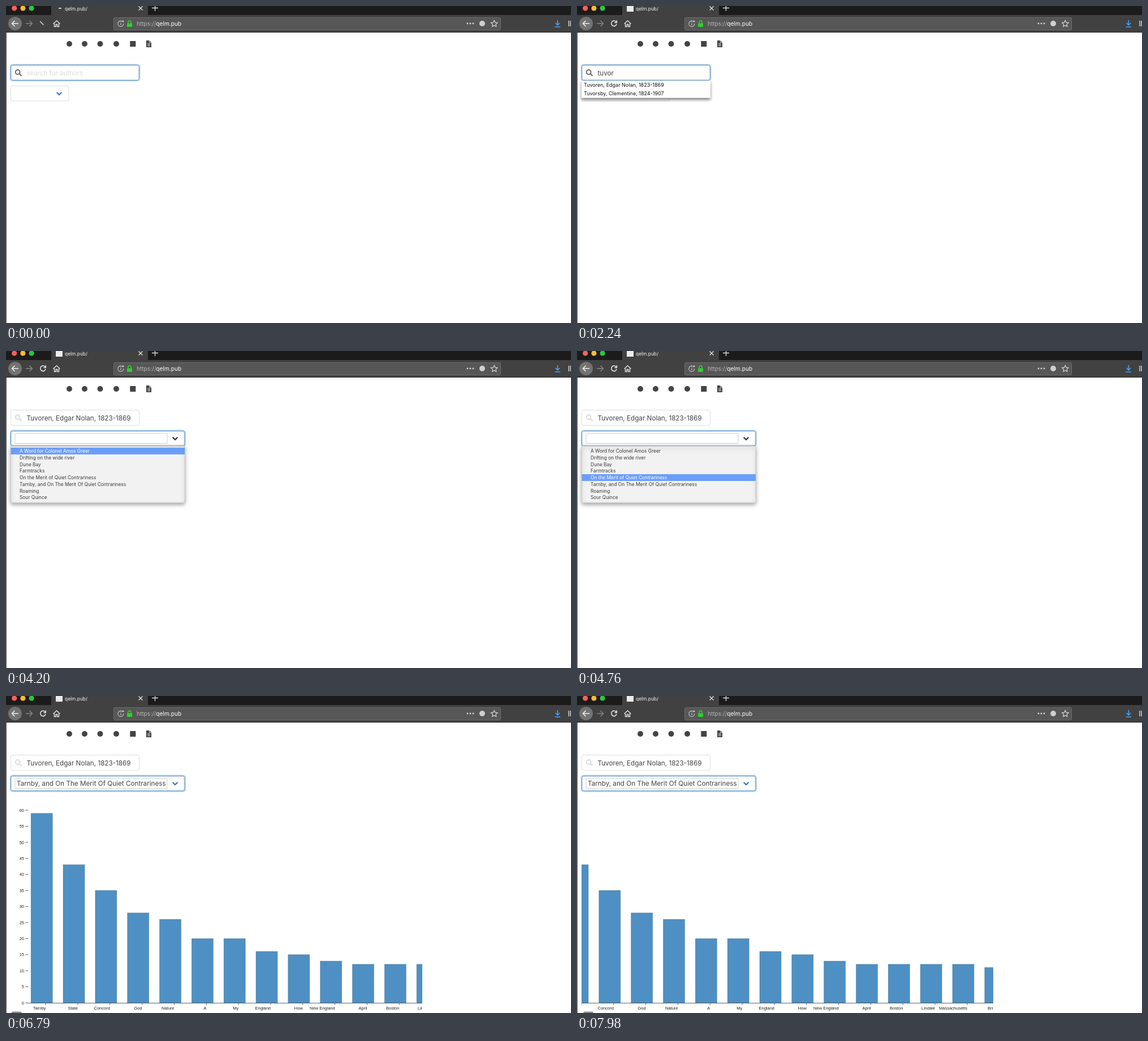
Recreate the animation shown at these times as an HTML page with a canvas. Size 999 px wide and 561 px high, loop 8 s.

```html
<!DOCTYPE html>
<html lang="en">
<head>
<meta charset="utf-8">
<style>
html, body { margin: 0; width: 100%; height: 100%; overflow: hidden; background: #fff; }
canvas { display: block; }
</style>
</head>
<body>
<canvas id="stage" width="999" height="561"></canvas>
<script>
const LOOP = 8000, STEP = 70;
const SANS = 'Inter, Roboto, sans-serif', CHART = '"Liberation Sans", Arial, sans-serif';
const c = document.getElementById('stage').getContext('2d');

const SITE = 'qelm.pub', QUERY = 'tuvor';
const AUTHOR = 'Tuvoren, Edgar Nolan, 1823-1869';
const ALL_AUTHORS = [
  'O.P. Fenmarsh & Company',
  'Oamholt, P. T. (Peter Sebastian), 1874-1966',
  'Oamve, Olo, 1873-1935',
  'Ocklow, Edna F. (Edna Frost), 1812-1903',
  'Ocklow, Gideon Harrowgate, 1839-1907',
  'Ocklow, Wyatt B. (Wyatt Boden), 1866-1931'
];
const MATCHES = [AUTHOR, 'Tuvorsby, Clementine, 1824-1907'];
const TITLES = [
  'A Word for Colonel Amos Greer', 'Drifting on the wide river', 'Dune Bay', 'Farmtracks',
  'On the Merit of Quiet Contrariness', 'Tarnby, and On The Merit Of Quiet Contrariness',
  'Roaming', 'Sour Quince'
];
const PICK = 5;
const WORDS = ['Tarnby', 'State', 'Concord', 'God', 'Nature', 'A', 'My', 'England', 'How',
  'New England', 'April', 'Boston', 'Lindale', 'Massachusetts', 'Bristol'];
const COUNTS = [59, 43, 35, 28, 26, 20, 20, 16, 15, 13, 12, 12, 12, 12, 11];

// Times of the hard changes, in ms
const T = { loaded: 840, widen: 910, keys: [1120, 1260, 1470, 1680, 1890], list: 1260, filter: 1890,
  hover: 2940, chosen: 3780, open: 3920, move: 4200, close: 5530, chart: 6160, bar: 6790, scroll: 7560 };

function text(s, x, y, size, color, font = SANS, align = 'left', weight = 400) {
  c.font = `${weight} ${size}px ${font}`;
  c.textAlign = align;
  c.fillStyle = color;
  c.fillText(s, x, y + size * 0.36);
  return c.measureText(s).width;
}

function rect(x, y, w, h, fill) {
  c.fillStyle = fill;
  c.fillRect(x, y, w, h);
}

function dot(x, y, r, fill) {
  c.fillStyle = fill;
  c.beginPath();
  c.arc(x, y, r, 0, 7);
  c.fill();
}

function box(x, y, w, h, r, fill, stroke) {
  c.beginPath();
  c.roundRect(x, y, w, h, r);
  if (fill) { c.fillStyle = fill; c.fill(); }
  if (stroke) { c.strokeStyle = stroke; c.lineWidth = 1; c.stroke(); }
}

function path(d, color, width = 1.5) {
  c.strokeStyle = color;
  c.lineWidth = width;
  c.stroke(new Path2D(d));
}

function shadow(blur, dy, color) {
  c.shadowBlur = blur;
  c.shadowOffsetY = dy;
  c.shadowColor = color;
}

function field(x, y, w, h, focus) {
  if (focus) shadow(3, 0, 'rgba(60,130,200,.7)');
  box(x, y, w, h, 3, '#fff', focus ? '#5a93c6' : '#dedede');
  shadow(0, 0, 'transparent');
}

function browser(t) {
  const loading = t < T.loaded;
  rect(0, 0, 999, 17, '#1b1b1b');
  rect(80, 0, 171, 17, '#414141');
  rect(0, 16, 999, 30, '#414141');
  rect(0, 46, 999, 1, '#262626');
  rect(0, 47, 1, 514, '#5a5a5a');
  ['#ff5f57', '#febc2e', '#28c840'].forEach((col, i) => dot(14.7 + 15.2 * i, 4, 4.6, col));

  if (loading) box(93 + 4 * Math.sin(t / 140), 3, 5, 2, 1, '#ddd');
  else rect(88, -1, 12, 11, '#ececec');
  text(SITE + '/', 104, 4.5, 8.4, '#f4f4f4');
  path('M234.5 .5l7 7m0-7l-7 7', '#e8e8e8', 1.2);
  path('M258 3.5h11M263.5-2v11', '#e0e0e0', 1.3);

  dot(16, 31, 12, '#737373');
  path('M22 31H11M15.5 26l-5 5 5 5', '#f2f2f2', 1.6);
  path('M35 31h11M41.5 26l5 5-5 5', '#858585', 1.5);
  if (t < STEP) path('M60 27l6.5 6.5', '#e0e0e0', 1.5);
  else if (loading) path('M60.5 26.5l9 9m0-9l-9 9', '#e0e0e0', 1.5);
  else {
    path('M69.3 28.2A4.7 4.7 0 1 0 70 32', '#e6e6e6', 1.6);
    path('M70.3 25.5v4h-4', '#e6e6e6', 1.6);
  }
  path('M83.5 31.5l6-5.5 6 5.5M85.5 31v5.5h2.8v-4h2.4v4h2.8V31', '#e6e6e6', 1.4);

  box(190.5, 20.5, 684, 22, 2, '#575757', '#6c6c6c');
  path('M206.5 28a5 5 0 1 0 1.3 3M203 30v4M203 27.7v1.2', '#c4c4c4', 1.1);
  dot(207, 27, 1.6, '#c4c4c4');
  box(214, 30.5, 9, 6.5, 1, '#30d02c');
  path('M215.8 31v-2.3a2.6 2.6 0 0 1 5.2 0V31', '#30d02c', 1.5);
  const w = text('https://', 231, 31.5, 10.15, '#b7b7b7');
  text(SITE, 231 + w, 31.5, 10.15, '#fff');
  [816, 821, 826].forEach(x => dot(x, 31, 1.4, '#d8d8d8'));
  dot(842, 31, 5, '#cfcfcf');
  path('M863.3 25.5l1.7 3.7 4 .5-3 2.7.8 4-3.5-2-3.5 2 .8-4-3-2.7 4-.5z', '#d8d8d8', 1.2);
  path('M975.3 25v8M971.5 30l3.8 3.8 3.8-3.8M970.5 37h9.5', '#45a1ff', 1.6);
  path('M995 26v10M998 26v10', '#d8d8d8', 1.4);
}

function pageIcons() {
  [112, 139, 166.5, 195].forEach(x => dot(x, 67, 5, '#444'));
  rect(219.3, 62, 10, 10, '#444');
  c.fillStyle = '#444';
  c.fill(new Path2D('M248 61h5.5l3.5 3.5V73h-9z'));
  path('M250 66.5h5M250 68.5h5M250 70.5h5M253.5 61v3.5h3.5', '#fff', 0.7);
}

function search(t) {
  const focus = t < T.open;
  field(8.5, 104.5, 227, 27, focus);
  const icon = focus ? '#6b6b6b' : '#dcdcdc';
  c.beginPath();
  c.arc(20.7, 117, 3.9, 0, 7);
  c.strokeStyle = icon;
  c.lineWidth = 2;
  c.stroke();
  path('M23.7 120l3.8 3.8', icon, 2.2);

  const typed = QUERY.slice(0, T.keys.filter(k => t >= k).length);
  if (t >= T.chosen) text(AUTHOR, 36.5, 118.5, 11.7, '#444');
  else if (!typed) text('search for authors', 36.5, 118.5, 11.5, '#dcdcdc');
  else {
    const w = text(typed, 36.5, 118.5, 11.7, '#444');
    const blinkOff = t >= 2240 && t < 3150 && (t - 2240) % 560 < 280;
    if (!blinkOff) rect(Math.round(36.5 + w), 111, 1, 14, '#333');
  }
}

function select(t) {
  const open = t >= T.open && t < T.close;
  const right = t >= T.chosen ? 316 : t >= T.widen ? 164 : 111;
  field(8.5, 141.5, right - 8.5, 26.5, t >= T.open);
  if (t >= T.chosen) box(16, 146, 269, 17.5, 0, null, '#cfcfcf');
  if (t >= T.close) text(TITLES[PICK], 19, 155, 11.7, '#444');
  path(`M${right - 21.3} 152.8l4.3 4.2 4.3-4.2`, open ? '#333' : '#3a75b8', 2.3);
}

function authorList(t) {
  if (t < T.list || t >= T.chosen) return;
  const full = t < T.filter, rows = full ? ALL_AUTHORS : MATCHES;
  const h = rows.length * 15.1 + 0.5;
  shadow(5, 3, 'rgba(0,0,0,.5)');
  rect(8, 132, 228, h, '#fff');
  shadow(0, 0, 'transparent');
  if (t >= T.hover) rect(8, 132, 228, 15, '#2f74e6');
  rows.forEach((s, i) =>
    text(s, 12, 140 + 15.1 * i, 9, t >= T.hover && !i ? '#fff' : '#111'));
  if (full) box(229, 134, 5, 17.5, 2.5, '#8a8a8a');
}

function titleList(t) {
  if (t < T.open || t >= T.close) return;
  const current = t < T.move ? -1 : Math.min(PICK, Math.floor((t - T.move) / 130));
  shadow(7, 3, 'rgba(0,0,0,.35)');
  box(8.5, 168.5, 307.5, 100, [0, 0, 3, 3], '#f2f2f2', '#cacaca');
  shadow(0, 0, 'transparent');
  TITLES.forEach((s, i) => {
    const y = 177 + 11.75 * i;
    if (i === current) rect(8.5, y - 6, 307.5, 12, '#6a9efb');
    text(s, 24, y, 8.35, i === current ? '#fff' : '#3a3a3a');
  });
}

function chart(t) {
  if (t < T.chart) return;
  const base = 543, unit = 341 / 60;
  const p = Math.min(1, Math.max(0, (t - T.scroll) / 420));
  const shift = 119 * p ** 1.5;
  c.save();
  c.beginPath();
  c.rect(8, 180, 728, 381);
  c.clip();
  c.translate(-shift, 0);
  for (let v = 0; v <= 60; v += 5) {
    const y = base - v * unit;
    text(v, 32, y, 7.5, '#222', CHART, 'right');
    rect(34.5, y - 0.4, 4.5, 0.9, '#444');
  }
  COUNTS.forEach((n, i) => {
    const x = 44.2 + 56.83 * i, h = n * unit;
    rect(x, base - h, 38, h, '#4e90c3');
    c.strokeStyle = 'rgba(50,90,125,.5)';
    c.lineWidth = 0.7;
    c.strokeRect(x, base - h, 38, h);
    rect(x + 25.5, base, 0.9, 4, '#555');
    text(WORDS[i], x + 26, 552.3, 7.5, '#222', CHART, 'right');
  });
  rect(39, base, 900, 1, '#666');
  c.restore();
  if (t >= T.bar) box(9.5 + 1.3 * p, 558.5, 18.5, 6, 3, '#8c8c8c');
}

function draw(now) {
  const t = Math.floor(now % LOOP / STEP) * STEP;
  rect(0, 0, 999, 561, '#fff');
  browser(t);
  pageIcons();
  search(t);
  select(t);
  chart(t);
  authorList(t);
  titleList(t);
}

const start = performance.now();
function tick() {
  draw(performance.now() - start);
  requestAnimationFrame(tick);
}
tick();
</script>
</body>
</html>
```
